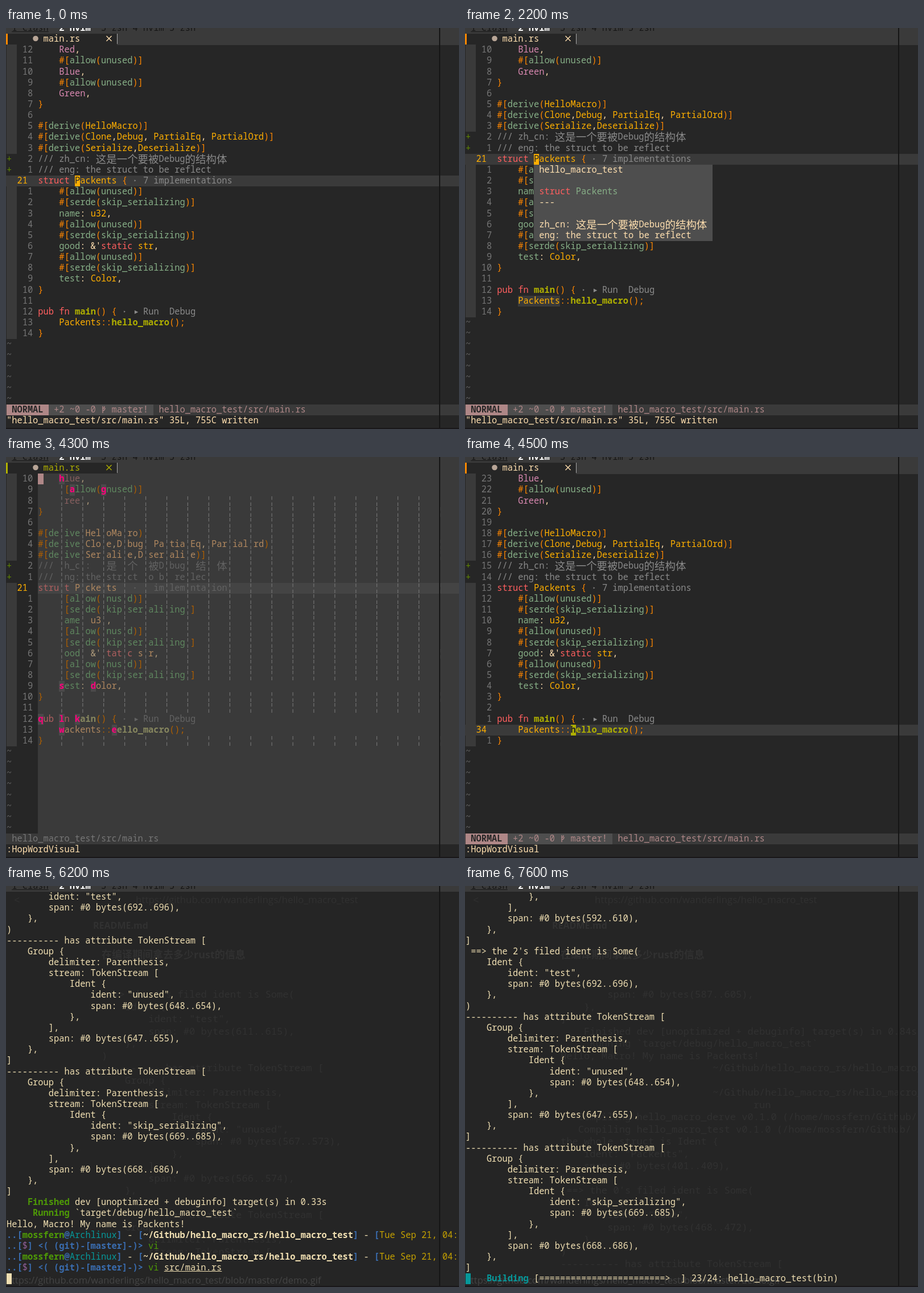
An HTML page that plays this animation: 796x704 px, repeating every 8000 ms.

```html
<!DOCTYPE html>
<html lang="en">
<head>
<meta charset="utf-8">
<title>Macro reflection in the editor</title>
<style>
  html, body { margin: 0; width: 100%; height: 100%; overflow: hidden; background: #262626; }
  #stage {
    position: relative; width: 796px; height: 704px; overflow: hidden; background: #262626;
    font: 15.38px "Noto Sans Mono", "Noto Sans CJK SC", "DejaVu Sans Mono", monospace;
    --r: #ff5f5f; --g: #afaf00; --y: #ffaf00; --o: #ff8700; --p: #d787af;
    --a: #87af87; --w: #ffdfaf; --k: #8a8a8a;
  }
  #stage div, #stage svg { position: absolute; }
  .row { white-space: pre; height: 19.15px; font-variant-ligatures: none; }
  .row span { display: inline-block; height: 19.15px; line-height: 17.6px; vertical-align: top; }
  .row .wide { font: 18.46px/17.6px "Noto Sans CJK SC", "Noto Sans CJK", sans-serif; }
  .row .sym { width: 9.228px; text-align: center; font-size: 11px; }
  .dim {
    --r: #af5f5f; --g: #87875f; --y: #af875f; --o: #af5f00; --p: #875f5f;
    --a: #5f875f; --w: #af9c7c; --k: #626262;
  }
  .r { --c: var(--r) } .g { --c: var(--g); font-weight: bold } .y { --c: var(--y) }
  .o { --c: var(--o) } .p { --c: var(--p) } .a { --c: var(--a) }
  .w { --c: var(--w) } .k { --c: var(--k) }
  .num { --c: #767676 } .cur { --c: #ffaf00 } .sign { --c: #5f8700 } .tilde { --c: #626262 }
  .msg { --c: #ffdfaf } .rose { --c: #af8787 } .olive { --c: #afaf00 } .dash { --c: #767676 }
  .mode { --c: #262626; font-weight: bold }
  .dark { --c: #161616 } .under { text-decoration: underline } .white { --c: #fff; font-weight: bold }
  .t { --c: #f0dfb2 } .blue { --c: #3a6db0; font-weight: bold } .teal { --c: #06989a }
  .leaf { --c: #4e9a06 } .gold { --c: #c4a000 } .plum { --c: #8f5f97 } .fail { --c: #cc0000 }
  .strong { font-weight: bold }
  .row span { color: var(--c); }
  .row .inv { background: var(--c); color: #262626; }
  .row .ref { background: #3a3a3a; }
  .row .found { background: #ffaf00; color: #262626; }
  .hint { background: #4a4a4a; font-weight: bold }
  .one { --c: #ff007c } .two { --c: #00dfff } .next { --c: #2b8db3; font-weight: normal }
  .ghost { color: #313131; white-space: pre; }
  .sans { font-family: "Open Sans", "Noto Sans CJK SC", sans-serif; }
  .code { font-size: 17.13px; line-height: 21.5px; }
</style>
</head>
<body>
<div id="stage"></div>
<script>
const CW = 9.228, LH = 19.15, X0 = 1, Y0 = 10.1, LOOP = 8000, USER = 'mossfern';
const stage = document.getElementById('stage');
const colX = c => X0 + c * CW;
const rowY = r => Y0 + r * LH;

// Text is held as terminal cells; a wide character is followed by an empty cell.
const isWide = ch => /[\u4e00-\u9fff]/.test(ch);
const seg = (c, s) => [...s].flatMap(ch => isWide(ch) ? [{ ch, c }, { ch: '', c }] : [{ ch, c }]);
const segs = (...parts) => parts.flatMap(([c, s]) => seg(c, s));
const escapeHtml = s => s.replace(/&/g, '&amp;').replace(/</g, '&lt;');

function runs(cells) {
  let out = '', text = '', key = null;
  const flush = () => { if (text) out += `<span class="${key}">${escapeHtml(text)}</span>`; text = ''; };
  for (const { ch, c } of cells) {
    if (!ch) continue;
    const kind = isWide(ch) ? ' wide' : /[‣▶]/.test(ch) ? ' sym' : '';
    if (c + kind !== key || kind === ' sym') { flush(); key = c + kind; }
    text += ch;
  }
  flush();
  return out;
}

const row = (r, cells, col = 0) =>
  `<div class="row" style="left:${colX(col)}px;top:${rowY(r)}px">${runs(cells)}</div>`;
const box = (x, y, w, h, color) =>
  `<div style="left:${x}px;top:${y}px;width:${w}px;height:${h}px;background:${color}"></div>`;
const cellBox = (col, r, cols, rows, color) => box(colX(col), rowY(r), cols * CW, rows * LH, color);
const addClass = (cells, from, count, c) => {
  for (const cell of cells.slice(from, from + count)) cell.c += ' ' + c;
};

function put(cells, col, ch, c) {
  while (cells.length <= col) cells.push({ ch: ' ', c: 'w' });
  if (cells[col].ch === '') cells[col - 1] = { ch: ' ', c: 'w' };
  if (cells[col + 1]?.ch === '') cells[col + 1] = { ch: ' ', c: 'w' };
  cells[col] = { ch, c };
}

// ---- editor ----
const field = (attr, decl) => ['    #[allow(unused)]', ...attr, '    ' + decl];
const SKIP = ['    #[serde(skip_serializing)]'];
const CODE = [
  '    Red,', ...field([], 'Blue,'), ...field([], 'Green,'), '}', '',
  '#[derive(HelloMacro)]',
  '#[derive(Clone,Debug, PartialEq, PartialOrd)]',
  '#[derive(Serialize,Deserialize)]',
  '/// zh_cn: 这是一个要被Debug的结构体',
  '/// eng: the struct to be reflect',
  'struct Packents { ‣ 7 implementations',
  ...field(SKIP, 'name: u32,'), ...field(SKIP, "good: &'static str,"), ...field(SKIP, 'test: Color,'),
  '}', '',
  'pub fn main() { ‣ ▶ Run  Debug',
  '    Packents::hello_macro();',
  '}',
];
const FIRST_LINE = 9, ADDED = [10, 11], STRUCT = 12, CALL = 25;
const HINTS = ('vh|va vg|cz|||cq cl|cd cs ch cw cy|z o ca|w u|g h l e t y|s a|d k|q r|i p|x cg|ck ce|' +
  'cr ct ci|cu co|cp cx|vs vd|||vq vl vk|vw ve|').split('|').map(s => s.split(' ').filter(Boolean));
const TOKENS = new RegExp([
  '(?<k>///.*| ‣.*)', '(?<r>\\b(?:struct|static|pub|fn)\\b)', '(?<g>\\b(?:main|hello_macro)\\b)',
  '(?<p>\\b(?:Red|Blue|Green)\\b)',
  '(?<a>\\b(?:allow|unused|derive|serde|skip_serializing|name|good|test)\\b)',
  '(?<y>\\w+)', '(?<o>::|[#\\[\\]\\(\\)\\{\\};])', '(?<w>.)'].join('|'), 'gu');

const highlight = line => [...line.matchAll(TOKENS)].flatMap(m =>
  seg(Object.keys(m.groups).find(k => m.groups[k] !== undefined), m[0]));

// Jump labels cover the word starts; indent guides run up to the first label.
function overlayHints(cells, line, hints, typed) {
  const words = [...line.matchAll(/[A-Za-z]\w*|个/g)];
  const labels = hints.map((label, i) => ({ label, col: seg('', line.slice(0, words[i].index)).length }))
    .filter(h => !typed || h.label[0] === typed)
    .map(h => typed ? { ...h, label: h.label.slice(1) } : h);
  const end = labels.length ? labels[0].col : 77;
  for (let c = 4; c < end; c += 4) put(cells, c, '¦', 'dash');
  for (const { label, col } of labels) {
    put(cells, col, label[0], 'hint ' + (label[1] ? 'two' : 'one'));
    if (label[1]) put(cells, col + 1, label[1], 'hint next');
  }
}

const popup = (r, col, width, lines) =>
  cellBox(col, r, width, lines.length, '#4e4e4e') + lines.map((l, i) => row(r + i, l, col + 1)).join('');

const DOC_STRUCT = [
  seg('msg', 'hello_macro_test'), [], segs(['r', 'struct '], ['a', 'Packents']), seg('msg', '---'), [],
  seg('msg', 'zh_cn: 这是一个要被Debug的结构体'), seg('msg', 'eng: the struct to be reflect'),
];
const DOC_CALL = [
  seg('msg', 'hello_macro::HelloMacro'), [], segs(['r', 'fn '], ['a', 'hello_macro'], ['msg', '()']),
];

const topBar = () => box(0, 0, 796, 10, '#3a3a3a') + row(-1, segs(
  ['dark', ' '], ['dark under', '1 Clash'], ['white', '  2 nvim'], ['dark', '  3 zsh 4 nvim 5 zsh']));

function tabLine(hop) {
  const ink = hop ? 'olive' : 'msg', stroke = hop ? '#afaf00' : '#ffdfaf';
  return box(195, 10, 601, 19.5, '#3a3a3a') + box(0, 10, 3, 19, hop ? '#afaf00' : '#ff8700') +
    row(0, seg(ink, 'main.rs'), 7) + box(194.5, 10, 1.5, 18, '#a8a8a8') +
    `<svg width="196" height="20" style="left:0;top:10px">
      <circle cx="52" cy="8.5" r="4.8" fill="#b8a596"/>
      <path d="M176.5 4l9 9m0-9l-9 9" stroke="${stroke}" stroke-width="1.4"/></svg>`;
}

function statusLine(hop) {
  const path = 'hello_macro_test/src/main.rs', bar = box(0, rowY(34), 796, LH, '#3a3a3a');
  if (hop) return bar + row(34, seg('num', path), 1);
  return bar + cellBox(0, 34, 8, 1, '#af8787') + cellBox(8, 34, 20, 1, '#4e4e4e') +
    row(34, segs(['mode', ' NORMAL '], ['rose', ' +2 ~0 -0   master!  ' + path])) +
    `<svg width="10" height="16" style="left:${colX(18)}px;top:${rowY(34) + 1}px">
      <path d="M3 2v12M3 10q4-1 4-5M3 6q3 0 3-4" fill="none" stroke="#af8787" stroke-width="1.4"/></svg>`;
}

function editor({ off = 2, line = STRUCT, col = 7, word = 8, ref, hover, doc, hop, typed, cmd = ':HopWordVisual' }) {
  const shown = CODE.slice(off), cursorRow = line - off + 1;
  let html = box(0, 10, 796, 694, '#262626');
  if (hop) html += box(colX(6), rowY(1), 740, 33 * LH, '#3a3a3a');
  html += cellBox(0, 1, 2, shown.length, '#3a3a3a');
  html += hop ? box(colX(6), rowY(cursorRow), 740, LH, '#444')
              : box(0, rowY(cursorRow), 796, LH, '#3a3a3a');
  shown.forEach((text, i) => {
    const n = i + off, r = i + 1, here = n === line, added = ADDED.includes(n);
    const cells = highlight(text);
    if (ref && n === CALL) addClass(cells, 4, 8, 'ref');
    if (here && hover) addClass(cells, col, word, 'found');
    if (hop) overlayHints(cells, text, HINTS[i], typed);
    else if (here) addClass(cells, col, 1, 'inv');
    if (hop && i === 0) put(cells, 0, ' ', 'rose inv');
    if (added) html += cellBox(0, r, 2, 1, '#262626');
    const label = here ? '  ' + (n + FIRST_LINE) : String(Math.abs(n - line)).padStart(5);
    const gutter = seg(here ? 'cur' : 'num', label.padEnd(6));
    if (added) gutter[0] = { ch: '+', c: 'sign' };
    html += row(r, [...gutter, ...cells]);
  });
  for (let r = shown.length + 1; r < 34; r++) html += row(r, seg('tilde', '~'));
  html += tabLine(hop) + statusLine(hop) + row(35, seg('msg', cmd));
  if (doc) html += popup(cursorRow + 1, 6 + col, doc === DOC_CALL ? 25 : 34, doc);
  return `<div class="${hop ? 'dim' : ''}">${html}</div>`;
}

// ---- terminal ----
const group = (name, a, b, c, d) => [
  '---------- has attribute TokenStream [', '    Group {', '        delimiter: Parenthesis,',
  '        stream: TokenStream [', '            Ident {', `                ident: "${name}",`,
  `                span: #0 bytes(${a}..${b}),`, '            },', '        ],',
  `        span: #0 bytes(${c}..${d}),`, '    },', ']'];
const ident = (n, name, a, b) => [
  ` ==> the ${n}'s filed ident is Some(`, '    Ident {', `        ident: "${name}",`,
  `        span: #0 bytes(${a}..${b}),`, '    },', ')'];

const DUMP = [
  '            },', '        ],', '        span: #0 bytes(592..610),', '    },', ']',
  ...ident(2, 'test', 692, 696),
  ...group('unused', 648, 654, 647, 655), ...group('skip_serializing', 669, 685, 668, 686),
].map(s => seg('t', s));

const prompt = (...typed) => [
  segs(['blue', '..['], ['leaf strong', USER], ['blue', '@'], ['teal', 'Archlinux'], ['blue', ']'], ['t', ' - '],
    ['blue', '['], ['t strong', '~/Github/hello_macro_rs/hello_macro_test'], ['blue', ']'], ['t', ' - '],
    ['blue', '['], ['gold', 'Tue Sep 21, 04:']),
  segs(['blue', '..['], ['plum', '$'], ['blue', '] <( (git)-[master]-)> '], ...typed),
];
const CURSOR = ['t inv', ' '];
const HISTORY = [
  ...DUMP,
  segs(['leaf strong', '    Finished'], ['t', ' dev [unoptimized + debuginfo] target(s) in 0.33s']),
  segs(['leaf strong', '     Running'], ['t', ' `target/debug/hello_macro_test`']),
  seg('t', 'Hello, Macro! My name is Packents!'),
  ...prompt(['leaf', 'vi']),
  ...prompt(['leaf', 'vi '], ['t under', 'src/main.rs']),
];
const CARGO = [['leaf', 'cargo'], ['t', ' run']];
const BUILDING = segs(['teal inv', ' '], ['teal strong', '   Building'],
  ['t', ' [' + '='.repeat(24) + '>  ] 23/24: hello_macro_test(bin)']);

// Faint browser page seen through the terminal window.
const REPO = 'https://github.com/wanderlings/hello_macro_test';
const PATH = ' '.repeat(26) + '~/Github/hello_macro_rs/hello_macro_test';
const PAGE_BEFORE = [...ident(1, 'test', 611, 615), ...group('unused', 567, 573, 566, 574),
  ...group('', 0, 0, 0, 0).slice(0, 4)];
const PAGE_AFTER = ['        span: #0 bytes(587..605),', '    },', ']',
  '    Finished dev [unoptimized + debuginfo] target(s) in 0.84s',
  '     Running `target/debug/hello_macro_test`', 'Hello, Macro! My name is Packents!',
  PATH, '', PATH, ' '.repeat(33) + 'run',
  `   Compiling hello_macro_derve v0.1.0 (/home/${USER}/Github/`,
  `   Compiling hello_macro_test v0.1.0 (/home/${USER}/Github/`,
  'the whole struct is Ident {', '    ident: "Packents",', '    span: #0 bytes(401..409),', '}',
  ...ident(0, 'name', 468, 472), group('', 0, 0, 0, 0)[0]];

const ghost = (x, y, size, text, style = '') =>
  `<div class="ghost sans" style="left:${x}px;top:${y - 12}px;font-size:${size}px;line-height:24px;${style}">${text}</div>`;

function terminal(lines, page = PAGE_BEFORE) {
  return box(0, 10, 796, 694, '#252525') +
    ghost(14, 24, 18, '&lt;') + ghost(228, 24, 17, REPO) +
    ghost(153, 69, 16, 'README.md', 'font-weight:bold') +
    ghost(168, 120, 18, '在编译期间拿去多少rust的信息', 'font-weight:bold') +
    `<div class="ghost code" style="left:168px;top:179px">${escapeHtml(page.join('\n'))}</div>` +
    ghost(10, 692, 16.5, REPO.slice(1) + '/blob/master/demo.gif', 'color:#444') +
    lines.slice(-36).map((l, r) => row(r, l)).join('');
}

// ---- timeline ----
const written = '"hello_macro_test/src/main.rs" 35L, 755C written';
const atStruct = o => editor({ ref: true, cmd: written, ...o });
const atCall = o => editor({ line: CALL, col: 14, word: 11, ...o });
const typing = (...typed) => terminal([...HISTORY, ...prompt(...typed, CURSOR)]);

const SCENES = [
  [0, atStruct({ off: 0, ref: false })],
  [300, atStruct({ off: 0 })],
  [600, atStruct({ off: 1 })],
  [900, atStruct({})],
  [1700, atStruct({ doc: DOC_STRUCT, hover: true })],
  [2200, atStruct({ doc: DOC_STRUCT })],
  [3400, editor({ hop: true })],
  [4300, editor({ hop: true, typed: 'v' })],
  [4500, atCall({})],
  [4900, atCall({ doc: DOC_CALL, hover: true })],
  [5400, atCall({ doc: DOC_CALL })],
  [6200, terminal([...HISTORY, segs(CURSOR)])],
  [6500, typing()],
  [6700, typing(['fail', 'c'])],
  [6800, typing(['fail', 'ca'])],
  [7100, typing(...CARGO)],
  [7400, terminal([...HISTORY, ...prompt(...CARGO), BUILDING], PAGE_AFTER)],
  [7600, terminal([...DUMP, BUILDING], PAGE_AFTER)],
];
const FRAME = topBar() + box(761, 0, 1.5, 704, '#151515') + box(0, 702, 796, 2, '#191719');

let current = -1;
function tick(now) {
  const t = now % LOOP;
  const index = SCENES.findLastIndex(([start]) => start <= t);
  if (index !== current) {
    current = index;
    stage.innerHTML = SCENES[index][1] + FRAME;
  }
  requestAnimationFrame(tick);
}
tick(0);
</script>
</body>
</html>
```
